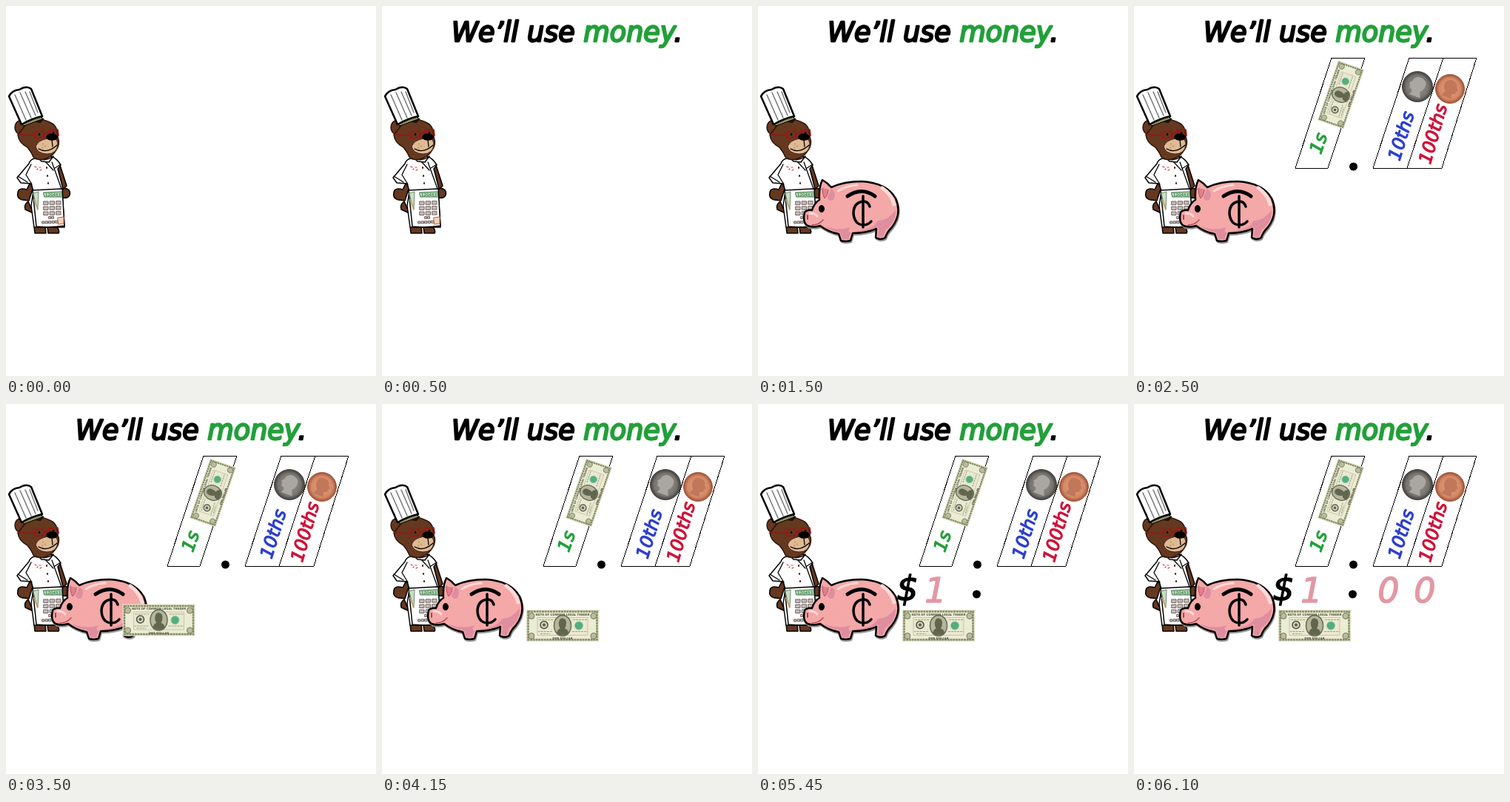
Animation of 500 by 500 pixels, one loop 8 s. Source, as an HTML page:

```html
<!DOCTYPE html>
<html lang="en">
<head>
<meta charset="utf-8">
<title>We’ll use money</title>
<style>
html, body { margin: 0; height: 100%; overflow: hidden; background: #fff; }
#stage { display: block; width: 100vw; height: 100vh; }
[data-at] { visibility: hidden; }
text { fill: currentColor; font-family: "DejaVu Sans", "Noto Sans", sans-serif; }
.hand { font-style: italic; stroke: currentColor; stroke-width: 2.4; stroke-linejoin: round; }
.title { font-size: 36.5px; }
.label { font-size: 24px; stroke-width: 1.2; text-anchor: middle; }
.digit { font-size: 46px; stroke-width: 1.5; text-anchor: middle; }
.green { color: #22a03a; }
.blue { color: #2c3fd0; }
.red { color: #cf1238; }
.pink { color: #e298a4; }
.ink { stroke: #000; stroke-linejoin: round; stroke-linecap: round; }
.line { fill: none; }
</style>
</head>
<body>
<svg id="stage" viewBox="0 0 500 500">
  <defs>
    <radialGradient id="silver"><stop offset="0" stop-color="#99958f"/><stop offset=".75" stop-color="#77736f"/><stop offset="1" stop-color="#3f3d3c"/></radialGradient>
    <radialGradient id="copper"><stop offset="0" stop-color="#e5a27f"/><stop offset=".75" stop-color="#d38765"/><stop offset="1" stop-color="#9c5036"/></radialGradient>
    <path id="profile" d="M-7 12Q-3 8-6 5Q-10 5-9 1L-11-1L-8-5Q-7-12 1-12Q10-11 9-2Q8 3 5 5L8 12Z"/>
    <g id="bill">
      <path d="M-49-21.5H49V21.5H-49Z" fill="#e3e3c6"/>
      <path d="M-46.500-19H46.500V19H-46.500Z" fill="#ecebd4" stroke="#858c69" stroke-width="2.5" stroke-dasharray="3 .7"/>
      <path d="M-34-11H34V13H-34Z" fill="#e9e8d0" stroke="#b6ba9c" stroke-width=".7"/>
      <g fill="#b8be9b" stroke="#737b5d">
        <circle cx="-42" cy="-13" r="4"/><circle cx="42" cy="-13" r="4"/>
        <circle cx="-42" cy="14" r="4"/><circle cx="42" cy="14" r="4"/>
      </g>
      <path d="M-32-8H-13M14-8H34M-33 8H-14M13 8H34M-30 11H-17" stroke="#9aa883" stroke-width="1.2" stroke-dasharray="3 1"/>
      <circle cx="-25" cy="-1" r="5" fill="#d0d2b8" stroke="#4c5141" stroke-width="1.5"/>
      <circle cx="-25" cy="-1" r="2" fill="#555a48"/>
      <circle cx="22" cy="0" r="5.5" fill="#55ad7d" stroke="#8cc7a1"/>
      <ellipse rx="11.500" ry="14" fill="#b5b79c" stroke="#656a53" stroke-width="1.5"/>
      <path d="M-8 11Q-7 4-3 4Q-6 0-5-5Q-4-10 0-10Q5-9 5-4Q5 1 3 4Q8 5 8 11Q0 15-8 11" fill="#63664f"/>
      <g font-size="3.8" font-weight="bold" text-anchor="middle" style="color:#4b523b">
        <text y="-14">NOTE OF COMMON LEGAL TENDER</text>
        <text y="18.500">ONE DOLLAR</text>
      </g>
    </g>
  </defs>

  <g id="bear" class="ink" stroke-width="1.5">
    <g fill="#653820">
      <path d="M32 240L28 248Q17 245 16 252Q14 260 22 262L31 263L37 244Z"/>
      <path d="M30 264Q24 268 26 275L37 280Z"/>
      <path d="M67 214L72 212L82 243L77 248Z"/>
      <ellipse cx="80" cy="253" rx="6.500" ry="6.500"/>
      <path d="M38 298H53L54 307H39ZM56 299H69Q73 304 71 307H57Z"/>
    </g>
    <path d="M39 206Q33 207 31 213L15 232L20 239L34 240L37 250L34 270L38 299L79 299L76 252L77 247L70 220L74 215Q69 206 61 203Z" fill="#fff"/>
    <path d="M34 214L27 228L35 241M16 230L29 238M62 211L75 247M52 209L64 222M66 219L74 214" class="line" stroke-width="1.3"/>
    <path d="M42 204Q51 212 64 203L58 211L48 210Z" fill="#fff"/>
    <path d="M39 217L41 218M45 218H47M42 221L43 220M46 222L48 221" stroke="#c43f3f" stroke-width="1.2"/>
    <path d="M55 218V219M56 229V230M57 239V240" stroke="#622" stroke-width="2.2"/>

    <g fill="#653820" stroke="#2c150a">
      <ellipse cx="20" cy="164" rx="8" ry="9.500"/>
      <path d="M27 160Q42 148 59 157Q70 161 70 177Q74 187 67 196Q62 204 52 207Q41 209 37 204Q34 197 29 191Q17 185 16 174Q20 169 27 160Z"/>
    </g>
    <path d="M38 156Q40 151 46 150L43 153L51 152L47 157Z" fill="#301207" stroke-width="1"/>
    <path d="M57 179Q70 177 70 187Q69 200 55 200Q42 199 40 190Q43 181 57 179" fill="#e0ba92" stroke="#422" stroke-width="1"/>
    <path d="M44 193Q56 200 69 188M62 181L63 190" class="line" stroke-width="1.3"/>
    <path d="M50 186V187M53 189V190M49 191V192" stroke="#9a6b4d" stroke-width="1"/>
    <path d="M18 174L37 175M38 170L50 169L52 177L40 179ZM52 173L57 171M58 168L70 167L71 175L60 177Z" class="line" stroke="#a50f12" stroke-width="1.6"/>
    <path d="M45 173V174M64 171V172" stroke="#1a0b05" stroke-width="2.5"/>
    <ellipse cx="62" cy="177" rx="7" ry="4"/>

    <path d="M22 157L48 149L49 153L24 162Z" fill="#8c9360" stroke-width="1"/>
    <path d="M4 122Q8 114 18 113Q28 107 34 112L49 149Q35 152 21 160Z" fill="#fff" stroke-width="2.5"/>
    <path d="M12 120L27 154M19 117L34 151M26 116L40 148M32 116L43 144" class="line" stroke="#777" stroke-width="1.5"/>

    <path d="M36 249L76 247L79 297Q60 300 41 298Z" fill="#fff"/>
    <path d="M37 253L44 251L43 275Z" fill="#cadfc7" stroke="#6a8a66" stroke-width="1"/>
    <path d="M38 262L42 274" stroke="#d8ab78" stroke-width="1.5"/>
    <path d="M51 252L75 251L76 258H52Z" fill="#b8dcb8" stroke="#387145" stroke-width="1"/>
    <g id="keys" fill="#c8bcb7" stroke="#554947" stroke-width=".8"></g>
    <path d="M70 286L78 285V294L71 295Z" fill="#f0d2ba" stroke="#bb6450" stroke-width="1"/>
    <text x="63.500" y="257" font-size="5.5" text-anchor="middle" stroke="none" style="color:#245c32">120453</text>
  </g>

  <text class="hand title" x="94" y="48" data-at="500">We’ll use <tspan class="green" fill="currentColor">money</tspan>.</text>

  <g id="pig" class="ink" data-at="1500" style="filter:drop-shadow(1px 2px 0 #999)">
    <path d="M83 262Q82 245 87 235Q94 239 99 245Q116 237 140 237Q174 239 186 260Q195 281 181 299Q174 306 172 313Q166 317 159 313L160 301Q146 307 128 307L125 317Q118 319 112 317L109 308Q96 306 84 297Q75 300 67 297Q60 293 63 279Q66 275 73 276Q76 266 83 262Z" fill="#f4a8a8" stroke-width="2.5"/>
    <g fill="#df8e9f" stroke="none">
      <path d="M89 297Q108 305 125 299Q120 305 125 307L122 315H114L111 306Q98 304 89 297Z"/>
      <path d="M130 304Q156 303 162 290Q174 291 186 276Q187 292 172 303L169 312H162L163 298Q147 306 130 304Z"/>
      <path d="M99 247Q107 252 102 262Q95 265 94 258Z"/>
    </g>
    <g class="line" stroke="#ffd9d5" stroke-width="3">
      <path d="M108 250Q119 243 134 242"/>
      <path d="M168 246Q180 254 184 268" stroke-width="5"/>
      <path d="M70 280Q77 280 80 284"/>
    </g>
    <path d="M87 246Q87 255 90 260Q95 255 95 248" fill="#e17f8a" stroke="#b65465" stroke-width="1"/>
    <path d="M67 283V288" stroke="#9e4856" stroke-width="2"/>
    <path d="M73 296Q82 296 88 289" class="line" stroke="#a94f5e" stroke-width="1.5"/>
    <ellipse cx="86" cy="274" rx="3.500" ry="4.500"/>
    <path d="M121 257Q140 244 158 257" class="line" stroke-width="5"/>
    <path d="M151 271Q149 264 142 264Q129 266 129 280Q130 295 142 296Q149 296 153 291M142 257V299" class="line" stroke-width="3.5"/>
  </g>

  <g data-at="2500">
    <path d="M267 70H312L262 219H218ZM372 70H463L416 219H323ZM418 70L369 219" class="ink line" shape-rendering="crispEdges"/>
    <use href="#bill" transform="translate(279.500 120) rotate(-71) scale(.87)"/>
    <g transform="translate(383 109)">
      <circle r="20.500" fill="url(#silver)" stroke="#4b4846"/>
      <use href="#profile" fill="#aaa6a1" transform="rotate(20) scale(1.1)"/>
    </g>
    <g transform="translate(427 112)">
      <circle r="19.500" fill="url(#copper)" stroke="#a55b40"/>
      <use href="#profile" fill="#c0775a" transform="rotate(20) scale(-1 1)"/>
    </g>
    <g class="hand label">
      <text class="green" transform="translate(257 188) rotate(-71)">1s</text>
      <text class="blue" transform="translate(369 178) rotate(-73)">10ths</text>
      <text class="red" transform="translate(412 175) rotate(-74)">100ths</text>
    </g>
    <circle cx="296.500" cy="217" r="5.500"/>
  </g>

  <use id="payment" href="#bill" data-at="3500"/>

  <text class="hand digit" x="202" y="265" data-at="4800">$</text>
  <g data-at="5450">
    <text class="hand digit pink" x="240" y="268">1</text>
    <circle cx="295.500" cy="257" r="5.500"/>
  </g>
  <g class="hand digit pink" data-at="6100">
    <text x="344" y="268">0</text>
    <text x="393" y="268">0</text>
  </g>
</svg>
<script>
const LOOP = 8000;
const BILL_SETTLES = 4150;
const parts = [...document.querySelectorAll('[data-at]')];
const payment = document.getElementById('payment');

// Apron keypad: three rows of three, a pair, then a row of five
let keys = '';
function addRow(count, x, y, step, width, height) {
  for (let i = 0; i < count; i++) {
    keys += `<rect x="${x + i * step}" y="${y - i * 0.2}" width="${width}" height="${height}"/>`;
  }
}
for (let row = 0; row < 3; row++) addRow(3, 51, 264 + row * 7, 8.5, 6, 4.5);
addRow(2, 58, 284.5, 4, 2.5, 3);
addRow(5, 49, 291, 4.5, 3, 3);
document.getElementById('keys').innerHTML = keys;

function draw(now) {
  const t = now % LOOP;
  for (const part of parts) {
    part.style.visibility = t >= part.dataset.at ? 'visible' : 'hidden';
  }
  payment.setAttribute('transform', t < BILL_SETTLES ? 'translate(206.5 292)' : 'translate(244 299.5)');
  requestAnimationFrame(() => draw(performance.now()));
}
draw(performance.now());
</script>
</body>
</html>
```
